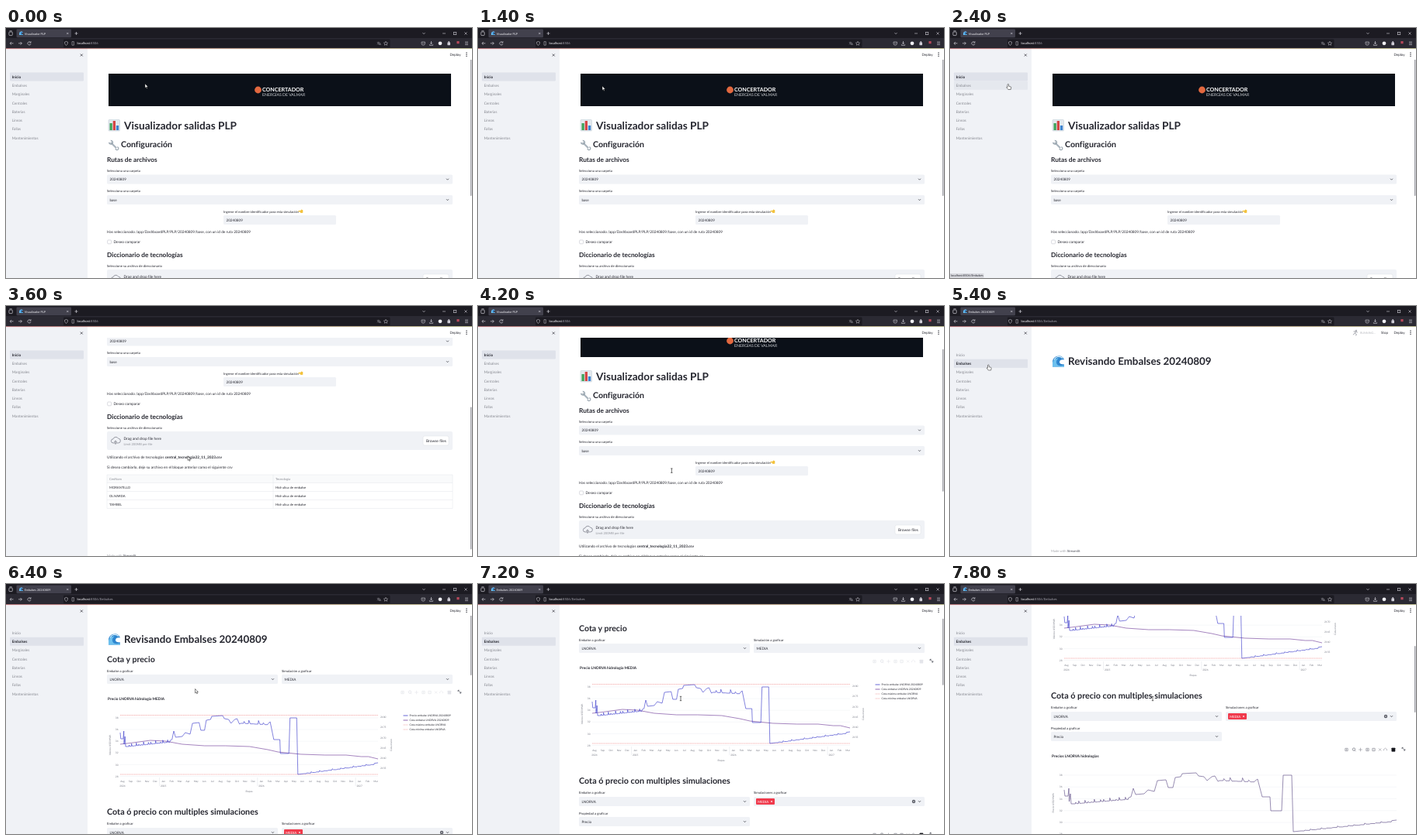
Write an HTML page that moves like this. It is 600x323 px and loops after 8 s.

```html
<!DOCTYPE html>
<html lang="es">
<head>
<meta charset="utf-8">
<title>Visualizador PLP</title>
<style>
html, body { margin: 0; width: 100%; height: 100%; overflow: hidden; background: #fff; }
svg { display: block; width: 100vw; height: 100vh; }
text { font-family: Lato, "Open Sans", sans-serif; text-rendering: geometricPrecision; font-variant-ligatures: none; white-space: pre; }
</style>
</head>
<body>
<svg id="stage" viewBox="0 0 600 323" xmlns="http://www.w3.org/2000/svg"></svg>
<script>
const INK = '#262730', GREY = '#85878f', FIELD = '#f0f2f6';
const LOOP = 8000, STEP = 200;

const text = (x, y, size, str, more = '') =>
  `<text x="${x}" y="${y}" font-size="${size}" fill="${INK}" ${more}>${str}</text>`;
const bold = (x, y, size, str, more = '') => text(x, y, size, str, 'font-weight="700" ' + more);
const rect = (x, y, w, h, fill, r = 0, more = '') =>
  `<rect x="${x}" y="${y}" width="${w}" height="${h}" rx="${r}" fill="${fill}" ${more}/>`;
const line = (d, color, w = 0.7, more = '') =>
  `<path d="${d}" fill="none" stroke="${color}" stroke-width="${w}" ${more}/>`;
const group = (id, inner) => `<g id="${id}">${inner}</g>`;
const chevron = (x, y, color = INK) => line(`M${x - 1.5} ${y - 0.8}l1.5 1.5l1.5 -1.5`, color, 0.7);
const cross = (x, y, r, color, w = 0.7) =>
  line(`M${x - r} ${y - r}l${2 * r} ${2 * r}m0 ${-2 * r}l${-2 * r} ${2 * r}`, color, w);
const label = (x, y, str) => text(x, y + 1.5, 4.27, str);
const box = (x, y, w, str = '') => rect(x, y, w, 12, FIELD, 1.5) + text(x + 3.5, y + 7.7, 4.6, str);
const select = (x, y, w, str) => box(x, y, w, str) + chevron(x + w - 6.5, y + 6);

const wave = (x, y, s) => `<g transform="translate(${x} ${y}) scale(${s / 15})">
  <path d="M0 14V8C0 3 4 0 8 0c4 0 6 2 7 5c-3-1-6 0-6 3c0 2 2 3 6 3v3z" fill="#2f86cf"/>
  <path d="M0 14V9c1-4 4-6 8-6c-3 2-4 5-2 8c1 2 5 2 9 1v2z" fill="#6cc0ee"/>
  <path d="M2 5C4 1 9-1 13 3" fill="none" stroke="#d8effb" stroke-width="1.2"/></g>`;

const bars = rect(132, 118.5, 14.5, 14.5, '#e3e9ee', 1, 'stroke="#b9c6d0" stroke-width=".5"') +
  rect(133.5, 123, 3.3, 9, '#3fa35b') + rect(137.7, 120, 3.3, 12, '#d64545') + rect(141.9, 126, 3.3, 6, '#3f83cf');

const wrench = line('M135.5 148.5l6 6', '#a9b4bd', 2.2, 'stroke-linecap="round"') +
  line('M132.8 147.8a2.3 2.3 0 1 0 2 -2.3', '#9aa6b0', 1.5) +
  line('M143.3 153.6a2 2 0 1 1 -2.4 2.3', '#9aa6b0', 1.2);

const hand = `<path d="M376.5 236l3-.2l.6-1.2l2.2.6v3.6l-3 .2l-.6-1.4l-2.2-.3z" fill="#f3c23c"/>`;

function homePage() {
  const rows = ['MORANTILLO', 'OLIVARDA', 'TAMBEL'];
  const frame = '#e3e5ea';
  return rect(132, 59, 441, 42, '#0b1018') +
    '<circle cx="324.5" cy="80" r="4.4" fill="#e2683f"/>' +
    bold(330, 81.6, 7.1, 'CONCERTADOR', 'style="fill:#fff"') +
    text(330, 87.8, 5.2, 'ENERGÍAS DE VALMAR', 'style="fill:#c9ccd0"') +
    bars + bold(152, 130.5, 13.65, 'Visualizador salidas PLP') +
    wrench + bold(148, 154.4, 10.6, 'Configuración') +
    bold(130, 173, 8.3, 'Rutas de archivos') +
    label(130, 184, 'Selecciona una carpeta') + select(130, 189.5, 445, '20240809') +
    label(130, 210.5, 'Selecciona una carpeta') + select(130, 216, 445, 'base') +
    label(280, 237, 'Ingrese el nombre identificador para esta simulación') + hand +
    box(280, 242, 145, '20240809') +
    text(130, 265.2, 4.73, 'Has seleccionado /app/DashboardPLP/PLP/20240809/base, con un id de ruta 20240809') +
    rect(130.7, 274, 4.8, 4.8, '#fff', 0.9, 'stroke="#b4b7c0" stroke-width=".5"') +
    text(138.5, 278, 4.8, 'Deseo comparar') +
    bold(130, 296, 8.33, 'Diccionario de tecnologías') +
    label(130, 307, 'Seleccione su archivo de direccionario') +
    rect(130, 312, 445, 24, FIELD, 2) +
    line('M138 327a2.6 2.6 0 0 1 0 -5.2a3.6 3.6 0 0 1 6.6 -.6a2.9 2.9 0 0 1 -.2 5.8zM141 329v-5m-1.8 1.8l1.8 -1.8l1.8 1.8', '#80838f', 0.8) +
    text(151.5, 322.5, 4.8, 'Drag and drop file here') +
    text(151.5, 329.8, 4.1, 'Limit 200MB per file', 'style="fill:#92949c"') +
    rect(537, 318, 33, 12, '#fff', 2, 'stroke="#d6d8de" stroke-width=".4"') +
    text(541, 325.7, 4.85, 'Browse files') +
    text(130, 347.2, 4.75, 'Utilizando el archivo de tecnologías <tspan font-weight="700">central_tecnologia22_11_2023.csv</tspan>') +
    text(130, 360.1, 4.75, 'Si desea cambiarlo, deje su archivo en el bloque anterior como el siguiente csv') +
    rect(130, 368, 445, 10.5, '#f9fafb') +
    line('M130 368H575V411.5H130zM130 378.5H575M130 389.5H575M130 400.5H575M344 368V411.5', frame, 0.5) +
    text(133, 374.6, 4.1, 'CenNom', 'style="fill:#8b8d95"') + text(347, 374.6, 4.1, 'Tecnologia', 'style="fill:#8b8d95"') +
    rows.map((r, i) => text(133, 385.6 + 11 * i, 4.2, r) + text(347, 385.6 + 11 * i, 4.2, 'Hidr ulica de embalse')).join('') +
    footer(472.5);
}

function footer(y) {
  return text(130, y + 1.5, 4.2, 'Made with <tspan fill="#777980" font-weight="700">Streamlit</tspan>', 'style="fill:#a3a5ab"');
}

// A slope with small upward teeth.
function ramp(x0, y0, x1, y1, step, tooth) {
  const pts = [];
  for (let x = x0, i = 0; x < x1; x += step, i++) {
    const y = y0 + (y1 - y0) * (x - x0) / (x1 - x0);
    pts.push([x, y], [x + step * 0.6, y], [x + step * 0.7, y - tooth * (0.5 + 0.5 * Math.sin(i * 2.4))]);
  }
  return pts;
}

// Price curve: x over 428 units, y in pixels below the 38 mark.
const price = [
  [0, 19], [1, 27], [5, 27], [6, 17], [6.5, 34], [8, 24], [9, 37],
  ...ramp(12, 37, 84, 31, 4, 4),
  [86, 28], [89, 17], [92, 25], [103, 24], [108, 19], [116, 21], [120, 7], [131, 6], [134, 16], [140, 16],
  [143, 3], [150, 2], [152, -2], [170, -3], [173, 1], [180, 2], [184, 7], [190, 2], [194, 1], [198, 8],
  ...ramp(200, 7, 248, 9, 8, 5),
  [249, 5], [255, 28], [265, 28], [266, 46], [280, 46], [282, 0], [293, 0], [295, 73],
  ...ramp(305, 72, 420, 60, 7, 2), [428, 58]
];
const level = [[0, 34], [22, 32], [50, 29], [75, 30], [103, 34], [140, 36], [175, 36], [215, 37], [245, 41], [262, 44], [300, 47],
  [340, 48], [375, 48], [400, 50], [412, 50], [428, 53]];
const curve = (pts, x, w, y) =>
  'M' + pts.map(p => (x + p[0] * w / 428).toFixed(1) + ' ' + (y + p[1]).toFixed(1)).join('L');

function modebar(y, color) {
  const sq = (x, w) => rect(x - w / 2, y - w / 2, w, w, 'none', 0.2, `stroke="${color}" stroke-width=".7"`);
  return sq(510.5, 3.4) + `<circle cx="510.5" cy="${y}" r=".8" fill="${color}"/>` +
    `<circle cx="520" cy="${y - 0.4}" r="1.7" fill="none" stroke="${color}" stroke-width=".9"/>` +
    line(`M521 ${y + 0.8}l1.5 1.5M528.5 ${y - 2.3}v4.6m-2.3 -2.3h4.6M552 ${y - 1.6}l3.2 3.2m0 -3.2l-3.2 3.2M558.5 ${y + 1.2}v-1.5l2 -1.6l2 1.6v1.5`, color, 0.6) +
    sq(537.5, 3.4) + sq(545.5, 3.4) + line(`M536.5 ${y}h2m-1 -1v2M544.5 ${y}h2`, color, 0.5) +
    rect(568.6, y - 2.2, 4.6, 4.6, color, 0.4) +
    line(`M582 ${y - 1}v-1.7h1.7M584 ${y + 1}h1.8v-1.8M582 ${y - 2.6}l3.8 3.6`, '#4a4c57', 0.7);
}

const tick = (x, y, str, more = '') => text(x, y + 1.1, 3.2, str, 'style="fill:#777a85" ' + more);
const upright = (x, y, str) => tick(0, 0, str, `text-anchor="middle" transform="translate(${x} ${y}) rotate(-90)"`);

function grid(x1, y, step) {
  let s = '';
  for (let i = 0; i < 6; i++)
    s += line(`M147 ${y + step * i}H${x1}`, '#eceef2', 0.5) + tick(144.5, y + step * i, 38 - 2 * i, 'text-anchor="end"');
  return s;
}

function months() {
  const names = 'Jan Feb Mar Apr May Jun Jul Aug Sep Oct Nov Dec'.split(' ');
  let s = '';
  for (let i = 0; i < 32; i++) {
    const x = 150 + 10.52 * i, m = (i + 7) % 12;
    s += tick(x, 255, names[m], 'text-anchor="middle"');
    if (i === 0 || m === 0) s += tick(x, 260.5, 2024 + Math.floor((i + 7) / 12), 'text-anchor="middle"');
    if (m === 0) s += line(`M${x - 5} 250v11`, '#d3d6dd', 0.4);
  }
  return s;
}

const BLUE = '#4040cc', PURPLE = '#74439c';

function legend() {
  const items = [
    ['Precio embalse LNORVA 20240809', BLUE, ''], ['Cota embalse LNORVA 20240809', PURPLE, ''],
    ['Cota máxima embalse LNORVA', '#f0a8a8', '1 .6'], ['Cota mínima embalse LNORVA', '#f0a8a8', '1 .6']];
  return items.map(([name, color, dash], i) =>
    line(`M511.5 ${170 + 6 * i}h6`, color, 0.8, `stroke-dasharray="${dash}"`) + text(519.5, 171.2 + 6 * i, 3.4, name)).join('');
}

function reservoirBody() {
  const right = [2180, 2175, 2170, 2165, 2160, 2155];
  return bold(130, 100.8, 10.6, 'Cota y precio') +
    label(130, 112, 'Embalse a graficar') + label(355, 112, 'Simulación a graficar') +
    select(130, 117, 220, 'LNORVA') + select(355, 117, 220, 'MEDIA') +
    modebar(140, '#e4e5ea') + bold(131, 149.8, 4.8, 'Precio LNORVA hidrología MEDIA') +
    grid(479, 173, 15.1) + right.map((v, i) => tick(482, 172 + 13.25 * i, v)).join('') +
    upright(134, 208, 'Valores US$/MWh') + upright(496, 208, 'Cota msnm') +
    months() + tick(313, 268, 'Etapas', 'text-anchor="middle"') +
    line('M147 169.5H479M147 246H479', '#f08a8a', 0.6, 'stroke-dasharray="1.2 .6"') +
    line(curve(level, 147, 332, 173), PURPLE, 0.65) +
    line(curve(price, 147, 332, 173), BLUE, 0.65) + legend() +
    bold(130, 297.8, 10.8, 'Cota ó precio con multiples simulaciones') +
    label(130, 309, 'Embalse a graficar') + label(355, 309, 'Simulaciones a graficar') +
    select(130, 315, 220, 'LNORVA') + select(355, 315, 220, '') +
    rect(358, 317, 24, 8, '#f03a4c', 1) + text(360.3, 322.6, 4.3, 'MEDIA', 'style="fill:#fff"') + cross(378, 321, 1, '#fff', 0.6) +
    `<circle cx="561" cy="321" r="2.2" fill="#5a5c66"/>` + cross(561, 321, 0.8, '#fff', 0.5) +
    label(130, 336, 'Propiedad a graficar') + select(130, 341, 220, 'Precio') +
    modebar(364, '#8a8c96') + rect(568.6, 361.8, 4.6, 4.6, '#15161c', 0.4) +
    bold(131, 374.2, 4.8, 'Precios LNORVA hidrologías') +
    grid(575, 397, 15.25) + upright(133, 433, 'Precio US$/MWh') +
    line(curve(price, 147, 428, 397), '#604f88', 0.65);
}

const menu = ['Inicio', 'Embalses', 'Marginales', 'Centrales', 'Baterias', 'Lineas', 'Fallas', 'Mantenimientos'];
const itemY = i => 63 + 11.28 * i;

function sidebar() {
  return rect(0, 26, 105, 297, FIELD) +
    rect(5, 0, 95, 11, '#e5e8ee', 1, 'id="hover"') + rect(5, 0, 95, 11, '#dfe2ea', 1, 'id="chosen"') +
    cross(97.3, 35, 1.5, INK) +
    menu.map((m, i) => text(7.7, itemY(i) + 1.7, 4.75, m, 'class="item"')).join('');
}

function header() {
  return rect(105, 26, 495, 15, '#fff') +
    '<defs><linearGradient id="strip"><stop stop-color="#ff4b4b"/><stop offset="1" stop-color="#fffd80"/></linearGradient></defs>' +
    text(571.5, 35.9, 4.5, 'Deploy') +
    [32, 34.2, 36.4].map(y => `<circle cx="593" cy="${y}" r=".7" fill="${INK}"/>`).join('') +
    group('running', `<circle cx="523" cy="31.8" r="1" fill="#9a9ca4"/>` +
      line('M522.5 33l-1.2 2.2l2 1.2l-.6 2M521.3 35.2l-2.4 2M519.6 33l2.6 -.2l2.6 1.4', '#9a9ca4', 0.9) +
      text(528, 35.8, 3.7, 'RUNNING...', 'style="fill:#b3b5bb"') + text(555, 35.9, 4.5, 'Stop'));
}

function browser() {
  const pale = '#cfcdd6';
  return rect(0, 0, 600, 13, '#1c1b22') + rect(0, 13, 600, 13.5, '#2b2a33') +
    rect(13.5, 1.6, 70.5, 10.6, '#42414d', 1.3) +
    rect(3.9, 5, 4.4, 4.6, 'none', 0.8, `stroke="${pale}" stroke-width=".7"`) + line('M4.5 3.8h3.2', pale) +
    wave(17, 4.4, 5) + text(23.7, 8.5, 3.75, '', 'id="tab" style="fill:#f4f4f8"') +
    cross(79.3, 7, 1.1, pale, 0.6) + line('M88.5 7h4m-2 -2v4', pale) +
    chevron(538, 7, pale) + line('M562 7h4', pale, 0.6) +
    rect(576.4, 5.3, 3.4, 3.4, 'none', 0, `stroke="${pale}" stroke-width=".6"`) + cross(592, 7, 1.6, pale, 0.6) +
    line('M9.5 19.8h-4.4m1.9 -1.9l-1.9 1.9l1.9 1.9', pale) + line('M16 19.8h4.4m-1.9 -1.9l1.9 1.9l-1.9 1.9', pale) +
    line('M31.6 18.5a2.1 2.1 0 1 0 .4 2M32 17.2v1.8h-1.8', pale) +
    rect(74, 14.6, 420.5, 10.6, '#1c1b22', 1.3) +
    line('M77.5 17.4l2 .8c0 2.2 -.6 3.3 -2 4.3c-1.4 -1 -2 -2.1 -2 -4.3z', pale, 0.6) +
    line('M85 17.6h2.4v4.6h-2.4z', pale, 0.5) +
    text(91.5, 21.3, 4.2, 'localhost<tspan fill="#a09fa9">:8506<tspan id="path"></tspan></tspan>', 'style="fill:#fbfbfe"') +
    text(477.5, 20.7, 3.8, '文', `style="fill:${pale};font-family:'Noto Sans CJK SC',sans-serif"`) + text(480.2, 22.3, 3.8, 'A', `style="fill:${pale}"`) +
    line('M489 17.3l.8 1.7l1.8 .2l-1.3 1.2l.4 1.8l-1.7 -.9l-1.7 .9l.4 -1.8l-1.3 -1.2l1.8 -.2z', pale, 0.5) +
    line('M535 18h4.4v2a2.2 2.2 0 0 1 -4.4 0zM536.2 19.3l1 1l1 -1', pale, 0.6) +
    line('M547.5 17v3.6m-1.4 -1.4l1.4 1.4l1.4 -1.4M545.4 21.2v1.1h4.2v-1.1', pale, 0.7) +
    '<circle cx="559" cy="19.8" r="2.4" fill="#f0f0f4"/>' +
    rect(568.4, 18.4, 3.6, 3.8, pale, 0.4) + `<circle cx="570.2" cy="18" r=".9" fill="${pale}"/>` +
    rect(580.4, 17, 3.2, 3.2, '#b8485a', 0.5) +
    line('M591 18h4m-4 1.8h4m-4 1.8h4', pale, 0.6) +
    rect(0, 26.5, 600, 0.6, 'url(#strip)', 0, 'opacity=".7"');
}

const pointers = {
  arrow: '<path d="M0 0v5.4l1.3-1.1l.9 2l.9-.4l-.9-1.9h1.7z" fill="#fff" stroke="#111" stroke-width=".5"/>',
  hand: '<path d="M0 0c.8-.3 1.1.2 1.1.8v1.9l2.4.6c.7.2.8.6.7 1.2l-.5 2.5H.4L-1.8 4.2c.3-.7.9-.5 1.3 0V.7z" fill="#fff" stroke="#111" stroke-width=".5"/>',
  beam: '<path d="M-1.2-2.7h2.4M0-2.7v5.4M-1.2 2.7h2.4" fill="none" stroke="#111" stroke-width=".6"/>'
};

document.getElementById('stage').innerHTML =
  rect(0, 0, 600, 323, '#fff') +
  group('scroller', group('home', homePage()) + group('lake',
    wave(132, 64.5, 15) + bold(152, 76.2, 13.35, 'Revisando Embalses 20240809') +
    group('body', reservoirBody()) + group('foot', footer(316.5)))) +
  rect(598, 0, 1.4, 0, '#9b9ca3', 0.7, 'id="thumb"') +
  header() + sidebar() + browser() +
  group('status', rect(0, 317, 43.5, 6, '#d9dadf') + text(1, 321.4, 3.8, '', 'id="link"')) +
  group('cursor', Object.keys(pointers).map(k => group(k, pointers[k])).join(''));

const el = id => document.getElementById(id);
const show = (id, on) => el(id).setAttribute('display', on ? 'inline' : 'none');
const put = (id, attrs) => Object.entries(attrs).forEach(([k, v]) => el(id).setAttribute(k, v));
const items = [...document.querySelectorAll('.item')];

function at(keys, t) {
  let i = 0;
  while (i < keys.length - 1 && keys[i + 1][0] <= t) i++;
  const a = keys[i], b = keys[i + 1] || a;
  const k = b === a ? 0 : (t - a[0]) / (b[0] - a[0]);
  return a.slice(1).map((v, j) => v + (b[j + 1] - v) * k);
}

const scrollKeys = [[0, 0], [3000, 0], [3200, 55], [3400, 125], [3600, 150], [3800, 150], [4000, 95], [4200, 35],
  [4400, 5], [4600, 0], [7000, 0], [7200, 40], [7400, 100], [7600, 140], [7800, 150]];
const cursorKeys = [[0, 179, 72], [600, 179, 72], [800, 172, 74], [1200, 172, 74], [1400, 160, 75], [2000, 114, 76],
  [2200, 114, 76], [2400, 74.5, 72.5], [2600, 70, 95], [2800, 130, 150], [3200, 234, 194], [3800, 234, 194],
  [4400, 257, 222], [4600, 250, 212], [5000, 56, 80], [5200, 49, 76], [5600, 49, 76], [6000, 150, 110],
  [6400, 243.5, 135.5], [6800, 259, 147], [7200, 261, 148]];

function draw(t) {
  const lake = t >= 5200, loaded = t >= 5800;
  const [scroll] = at(scrollKeys, t), [x, y] = at(cursorKeys, t);
  put('scroller', { transform: `translate(0 ${-scroll})` });
  show('home', !lake);
  show('lake', lake);
  show('body', loaded);
  show('foot', !loaded);
  show('running', lake && t < 6200);
  show('thumb', !lake || loaded);
  put('thumb', lake ? { y: 32 + 0.32 * scroll, height: 86 } : { y: 33 + 0.65 * scroll, height: 184 });

  const page = lake ? 1 : 0;
  put('chosen', { y: itemY(page) - 5.5 });
  items.forEach((n, i) => {
    n.setAttribute('font-weight', i === page ? 700 : 400);
    n.setAttribute('fill', i === page ? INK : GREY);
  });
  el('tab').textContent = lake ? 'Embalses 20240809' : 'Visualizador PLP';
  el('path').textContent = lake ? '/Embalses' : '';

  const over = Math.round((y + 2 - 63) / 11.28);
  const inMenu = x > 5 && x < 100 && over >= 0 && over < menu.length;
  show('hover', inMenu);
  show('status', inMenu && t < 3400);
  if (inMenu) {
    put('hover', { y: itemY(over) - 5.5 });
    el('link').textContent = 'localhost:8506/' + menu[over];
  }
  const shape = inMenu ? 'hand' : (t >= 4200 && t < 4800) || t >= 6800 ? 'beam' : 'arrow';
  Object.keys(pointers).forEach(k => show(k, k === shape));
  put('cursor', { transform: `translate(${x} ${y})` });
}

// The screen refreshes only every STEP ms.
function tickFrame() {
  const t = performance.now() % LOOP;
  draw(Math.floor(t / STEP) * STEP);
  requestAnimationFrame(tickFrame);
}
tickFrame();
</script>
</body>
</html>
```
